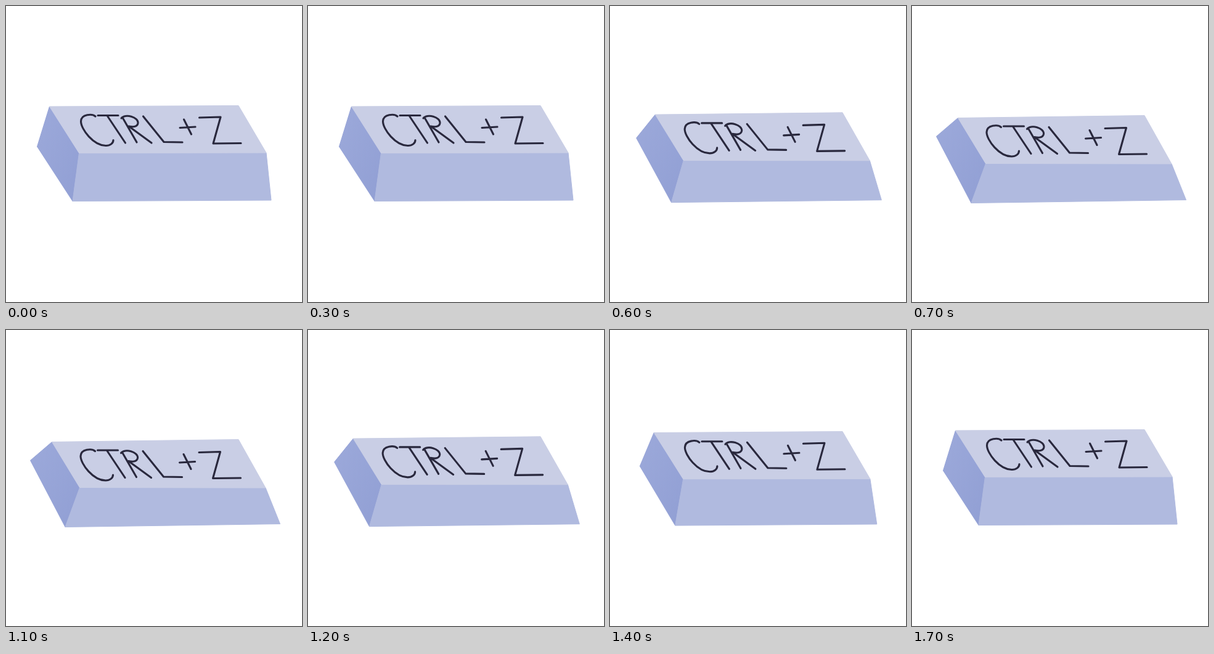
Write an HTML page that moves like this. It is 480x480 px and loops after 1800 ms.

```html
<!DOCTYPE html>
<html lang="en">
<head>
<meta charset="utf-8">
<title>Undo key</title>
<style>
  html, body { margin: 0; width: 100%; height: 100%; overflow: hidden; background: #fff; }
  svg { display: block; width: 100%; height: 100%; }
  .face { stroke-width: 1; stroke-linejoin: round; }
  .ink { fill: none; stroke: #29283d; stroke-width: 3.1; stroke-linecap: round; stroke-linejoin: round; }
</style>
</head>
<body>
<svg viewBox="0 0 480 480" role="img" aria-label="CTRL+Z">
  <defs>
    <linearGradient id="shade" x1="0" y1="0" x2="1" y2="1">
      <stop offset="0" stop-color="#9ca9da"/>
      <stop offset="1" stop-color="#919fd4"/>
    </linearGradient>
  </defs>
  <path id="side" class="face" fill="url(#shade)" stroke="#98a5d8"/>
  <path id="front" class="face" fill="#b0badf" stroke="#b0badf"/>
  <path id="top" class="face" fill="#c9cee5" stroke="#c9cee5"/>
  <g id="label" class="ink">
    <path d="M145 179C140 174.5 122 175 121.5 187C121.5 200 142 226.5 162 226.5C169 226.5 174 222.5 174 217.5"/>
    <path d="M149 177.5L182 177.5M164.5 178.5L193.5 222"/>
    <path d="M189 181L212 221M187 182C193 174 215 180 214 190C213 197 204 196 199 195L236 222"/>
    <path d="M222.5 179L256 220.5L286 221"/>
    <path d="M282 197.5L307 196M288.5 184L300.5 208"/>
    <path d="M313.5 181L348 180L336 223L381 222.5"/>
  </g>
</svg>
<script>
const STEP = 100, LOOP = 1800, DEPTH = 4;
const PRESS_FROM = 3, RELEASE_TO = 15;

const el = id => document.getElementById(id);
const face = (...corners) => "M" + corners.join("L") + "Z";

// Steps held at 100 ms: ease into the press, hold, then retrace it
function pressAt(ms) {
  const step = Math.floor((ms % LOOP) / STEP);
  const depth = Math.min(DEPTH, step - PRESS_FROM, RELEASE_TO - step);
  return Math.pow(Math.max(0, depth) / DEPTH, 1.2);
}

function draw(press) {
  const corner = (x, y, dx, dy) => [x + dx * press, y + dy * press];
  const backLeft = corner(70.5, 163, 4, 18.5);
  const backRight = corner(377, 161.5, 0, 16);
  const frontRight = corner(422, 238, -1, 18);
  const frontLeft = corner(118.5, 238.5, 1, 17);
  const baseLeft = corner(108, 316.5, -12, 3);
  const baseRight = corner(430, 315, 14.5, -0.5);
  // The far corner swings early, as the key tips back
  const farLeft = [50.5 - 11 * press, 228 - 16.5 * Math.sqrt(press)];

  el("side").setAttribute("d", face(backLeft, frontLeft, baseLeft, farLeft));
  el("front").setAttribute("d", face(frontLeft, frontRight, baseRight, baseLeft));
  el("top").setAttribute("d", face(backLeft, backRight, frontRight, frontLeft));
  el("label").setAttribute("transform", `translate(${corner(0, 0, -0.5, 17.5)})`);
}

const start = performance.now();
function tick() {
  draw(pressAt(performance.now() - start));
  requestAnimationFrame(tick);
}
tick();
</script>
</body>
</html>
```
